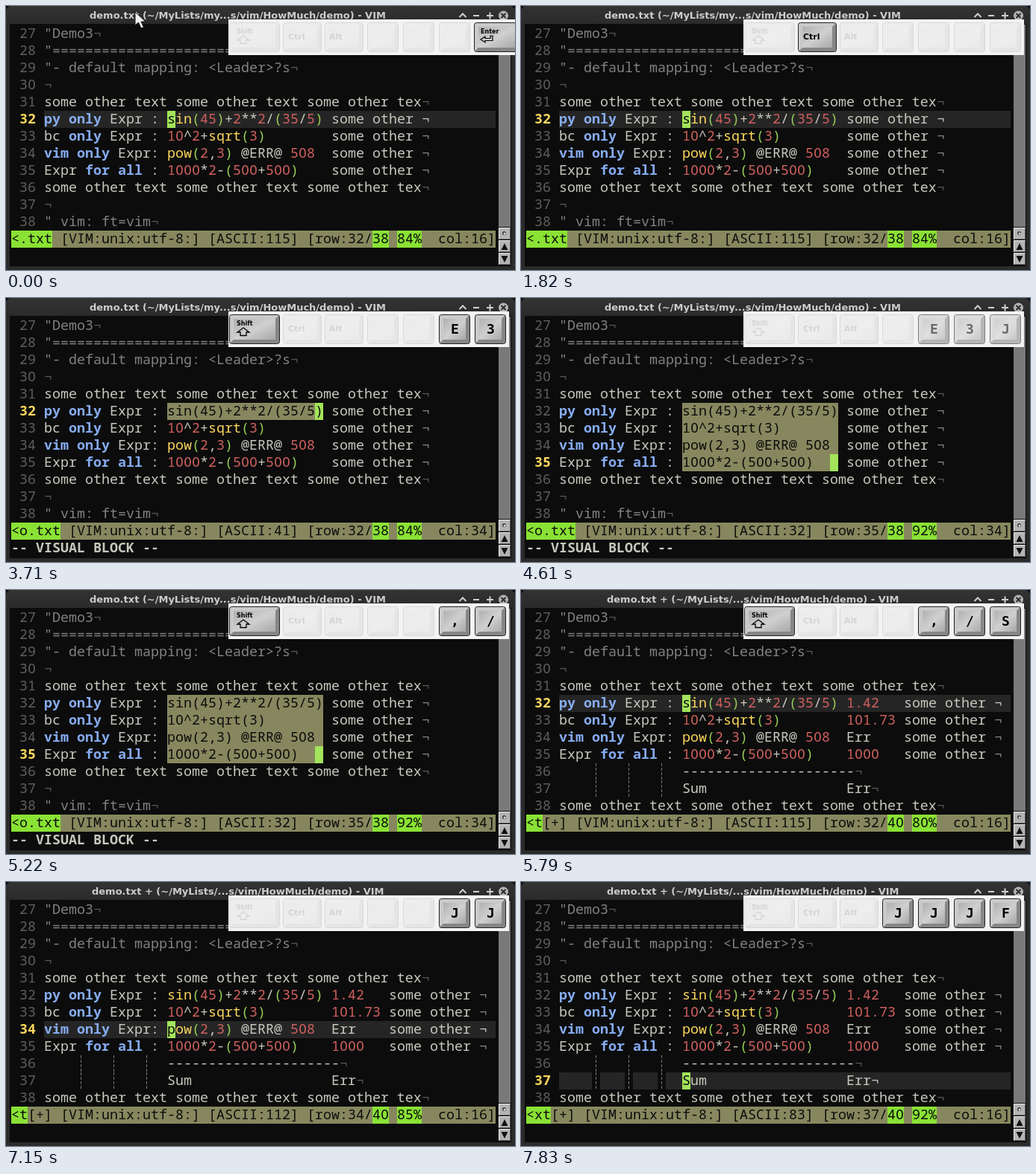
Write an HTML page that moves like this. It is 682 by 355 pixels and loops after 8 s.

```html
<!DOCTYPE html>
<html lang="en">
<head>
<meta charset="utf-8">
<title>Vim column sums</title>
<style>
  html, body { margin: 0; width: 100%; height: 100%; overflow: hidden; background: #2b2b2b; }
  svg { display: block; width: 682px; height: 355px; }
  text { white-space: pre; }
  .term text { font: 18.333px "Noto Sans Mono", "DejaVu Sans Mono", monospace; fill: #c8c8be; }
  .term .zero { font-family: "DejaVu Sans", sans-serif; font-size: 17.290px; }
  .term .key { fill: #86acf0; font-weight: 700; }
  .term .fn { fill: #fcd75e; }
  .term .num { fill: #d0605e; }
  .term .par { fill: #98cf58; }
  .term .note { fill: #828282; }
  .term .eol { fill: #585858; }
  .term .eol2 { fill: #868686; }
  .term .eol3 { fill: #c8c8c8; }
  .term .nr { fill: #5e5e5e; }
  .term .cur { fill: #fcd75e; font-weight: 700; }
  .term .ink { fill: #0c0c0c; }
  .term .msg { font-weight: 700; }
  .title { font: 700 13px "DejaVu Sans", sans-serif; fill: #cccccc; }
  .cap { font: 700 18px "DejaVu Sans Mono", monospace; text-anchor: middle; }
  .mod { font: 700 11px "DejaVu Sans", sans-serif; }
  .tiny { font: 700 8px "DejaVu Sans", sans-serif; }
</style>
</head>
<body>
<svg viewBox="0 0 682 355">
  <defs>
    <linearGradient id="bar" x1="0" y1="0" x2="0" y2="1">
      <stop offset="0" stop-color="#333"/><stop offset="1" stop-color="#2b2b2b"/>
    </linearGradient>
    <linearGradient id="face" x1="0" y1="0" x2="1" y2="1">
      <stop offset="0" stop-color="#b0b0b0"/><stop offset=".5" stop-color="#d0d0d0"/><stop offset="1" stop-color="#a8a8a8"/>
    </linearGradient>
  </defs>

  <rect width="682" height="355" fill="#2b2b2b"/>
  <rect width="682" height="22" fill="url(#bar)"/>
  <path d="M0 0h6q-5 1-6 6zM682 0h-6q5 1 6 6z" fill="#0a0a0a"/>
  <rect x="5" y="24" width="672" height="326" fill="#0c0c0c"/>
  <text id="title" class="title" y="17"></text>
  <g fill="none" stroke="#cfcfcf" stroke-width="2">
    <path d="M607.500 15l4.500-4.500 4.500 4.500M626 13h8M644 13h9M648.500 8.500v9"/>
    <circle cx="666.500" cy="13" r="6.500" fill="#b4b4b4" stroke="none"/>
    <path d="M663.500 10l6 6M669.500 10l-6 6" stroke="#2b2b2b"/>
  </g>

  <rect x="659" y="24" width="18" height="326" fill="#0c0c0c"/>
  <rect x="660" y="25" width="16" height="272" fill="#7a7a7a"/>
  <g id="buttons"></g>

  <g id="term" class="term"></g>
  <g id="keys"></g>
  <path id="mouse" d="M0 0v18l4.500-4 3.500 8 3.500-1.500-3.500-7.500h6z" fill="#f2f2f2" stroke="#111"/>
</svg>

<script>
const $ = id => document.getElementById(id);
const LOOP = 8000, CW = 11, LH = 23, LEFT = 7, TOP = 26, FIRST = 27, GUTTER = 4, COLS = 59;
const OLIVE = '#87875f', GREEN = '#8ae234', CURSOR = '#a3e45a';

// Each step overrides part of the state from its time on.
const steps = [
  [0, { row: 32, col: 15, keys: '', mods: '', msg: '', fade: 0, block: false, done: false, enter: true, mouse: [173, 8] }],
  [60, { mouse: [150, 14] }],
  [120, { mouse: [105, 27] }],
  [170, { mouse: [50, 42] }],
  [230, { mouse: [5, 50] }],
  [290, { mouse: null, enter: false }],
  [1820, { mods: 'C' }],
  [2630, { keys: 'V' }],
  [2670, { block: true, msg: '-- VISUAL BLOCK --' }],
  [3050, { mods: 'CS' }],
  [3280, { mods: 'S', keys: 'E' }],
  [3320, { col: 33 }],
  [3710, { keys: 'E3' }],
  [4000, { keys: 'E3J' }],
  [4040, { row: 35 }],
  [4610, { mods: '', fade: .5 }],
  [4770, { keys: '', fade: 0 }],
  [4860, { keys: ',' }],
  [5070, { mods: 'S' }],
  [5220, { keys: ',/' }],
  [5610, { keys: ',/S' }],
  [5650, { row: 32, col: 15, block: false, msg: 'block of 4 lines yanked' }],
  [5790, { done: true, msg: '' }],
  [6170, { fade: .35 }],
  [6300, { fade: .7 }],
  [6420, { keys: '', mods: '', fade: 0 }],
  [6890, { keys: 'J' }],
  [6930, { row: 33 }],
  [7110, { keys: 'JJ' }],
  [7150, { row: 34 }],
  [7230, { keys: 'JJJ' }],
  [7270, { row: 35 }],
  [7400, { keys: 'JJJJ' }],
  [7440, { row: 36 }],
  [7600, { row: 37 }],
  [7830, { keys: 'JJJF' }]
];

const filler = 'some other text some other text some other tex';
const head = ['"Demo3', '"' + '='.repeat(40), '"- default mapping: <Leader>?s', '', filler];
const exprs = ['py only Expr : sin(45)+2**2/(35/5)', 'bc only Expr : 10^2+sqrt(3)',
  'vim only Expr: pow(2,3) @ERR@ 508', 'Expr for all : 1000*2-(500+500)'];
const results = ['1.42', '101.73', 'Err', '1000'];
const pad = ' '.repeat(15);

function buffer(done) {
  const body = exprs.map((e, i) => e.padEnd(35) + (done ? results[i].padEnd(7) : '') + 'some other ');
  const tail = done
    ? [pad + '-'.repeat(21), (pad + 'Sum').padEnd(35) + 'Err', filler]
    : [filler, '', '" vim: ft=vim'];
  return [...head, ...body, ...tail];
}
const before = buffer(false), after = buffer(true);

const esc = s => s.replace(/&/g, '&amp;').replace(/</g, '&lt;');
const colX = c => LEFT + c * CW;
const rowY = r => TOP + r * LH;
const rect = (x, y, w, h, fill, more = '') =>
  `<rect x="${x}" y="${y}" width="${w}" height="${h}" fill="${fill}" ${more}/>`;
const label = (x, y, s, cls) => `<text x="${x}" y="${y}" class="${cls}">${s}</text>`;
// The terminal face has an open zero, one cell wide.
const openZero = s => s.replace(/0/g, '<tspan class="zero">0</tspan>');
const write = (c, r, s, cls = '') => s.trim() ? label(colX(c), rowY(r) + 17, openZero(esc(s)), cls) : '';
const fillCells = (c, r, n, color) => rect(colX(c), rowY(r), n * CW, LH, color);

const TOKEN = /\b(?:py|only|vim|for|all)\b|\b(?:sin|sqrt|pow)\b|\d+(?:\.\d+)?|[()]|[^\s()\d]+?(?=[\s()\d]|\b|$)|\s+/g;
function tokenClass(s) {
  if (/^(py|only|vim|for|all)$/.test(s)) return 'key';
  if (/^(sin|sqrt|pow)$/.test(s)) return 'fn';
  if (/^\d/.test(s)) return 'num';
  return /^[()]$/.test(s) ? 'par' : '';
}

function drawLine(s, r, st) {
  const nr = FIRST + r, here = nr === st.row, lit = here && !st.block;
  const isExpr = nr >= 32 && nr <= 35;
  let out = lit ? fillCells(GUTTER, r, COLS - GUTTER, '#252525') : '';
  out += write(1, r, String(nr), here ? 'cur' : 'nr');
  if (s[0] === '"') out += write(GUTTER, r, s, 'note');
  else if (!isExpr) {
    const indent = s.length - s.trimStart().length;
    out += write(GUTTER + indent, r, s.trimStart());
    if (indent) for (const c of [4, 8, 12]) {
      const x = colX(GUTTER + c);
      if (lit) out += fillCells(GUTTER + c, r, 1, '#0c0c0c');
      out += `<path d="M${x + 5.5} ${rowY(r)}v${LH}" stroke="#777" stroke-dasharray="4 2"/>`;
    }
  } else for (const m of s.matchAll(TOKEN)) {
    out += write(GUTTER + m.index, r, m[0], tokenClass(m[0]));
  }
  return out + write(GUTTER + s.length, r, '¬', lit ? 'eol3' : isExpr ? 'eol2' : 'eol');
}

// Repaint cells from column a up to b in dark ink on a colour.
function invert(s, r, a, b, color) {
  return fillCells(GUTTER + a, r, b - a, color) + write(GUTTER + a, r, s.slice(a, b), 'ink');
}

function drawStatus(st, lines) {
  const r = lines.length, total = st.done ? 40 : 38;
  const code = String(lines[st.row - FIRST].charCodeAt(st.col));
  const flag = st.done ? '[+]' : '';
  const name = '<' + 'demo.txt'.slice(code.length + flag.length - 7);
  const parts = [
    [name, GREEN],
    [`${flag} [VIM:unix:utf-8:] [ASCII:${code}] [row:${st.row}/`, OLIVE],
    [String(total), GREEN], [' ', OLIVE],
    [Math.floor(st.row / total * 100) + '%', GREEN],
    [`  col:${st.col + 1}]`, OLIVE]
  ];
  let c = 0, out = '';
  for (const [s, color] of parts) {
    out += fillCells(c, r, s.length, color) + write(c, r, s, 'ink');
    c += s.length;
  }
  return out;
}

function drawTerm(st) {
  const lines = st.done ? after : before, cur = st.row - FIRST;
  let out = lines.map((s, r) => drawLine(s, r, st)).join('');
  if (st.block) for (let r = 5; r <= cur; r++) out += invert(lines[r], r, 15, st.col + 1, OLIVE);
  out += invert(lines[cur], cur, st.col, st.col + 1, CURSOR);
  return out + drawStatus(st, lines) + write(0, lines.length + 1, st.msg, st.block ? 'msg' : '');
}

function keyCap(x, w, art, alpha) {
  const r = x + w, m = 6;
  return `<g opacity="${alpha}">
    ${rect(x + .5, 22.5, w - 1, 39, '#a0a0a0', 'rx="3"')}
    <path d="M${x + 1} 61V23H${r - 1}l-${m} ${m}H${x + m}V${62 - m}z" fill="#cacaca"/>
    <path d="M${r - 1} 23V61H${x + 1}l${m}-${m}H${r - m}V28z" fill="#868686"/>
    ${rect(x + m, 28, w - 2 * m, 28, 'url(#face)')}
    ${rect(x + .5, 22.5, w - 1, 39, 'none', 'rx="3" stroke="#222"')}
    ${art}</g>`;
}

function drawKeys(st) {
  const GHOST = .12, on = 1 - st.fade * (1 - GHOST);
  const alpha = down => down ? on : GHOST;
  const shift = label(309, 37, 'Shift', 'tiny') +
    '<path d="M318 40l8 6h-4v4.500h-8v-4.500h-4z" fill="none" stroke="#000" stroke-width="1.300"/>';
  let out = rect(298, 18, st.enter ? 390 : 376, 48, '#f3f3f3');
  out += keyCap(299, 68, shift, alpha(st.mods.includes('S')));
  out += keyCap(371, 52, label(378, 45, 'Ctrl', 'mod'), alpha(st.mods.includes('C')));
  out += keyCap(427, 52, label(433, 45, 'Alt', 'mod'), GHOST);
  const slots = st.keys.padStart(4);
  for (let i = 0; i < 4; i++) {
    const x = 484 + i * 48, ch = slots[i].trim();
    if (st.enter && i === 3) {
      const art = label(636, 37, 'Enter', 'tiny') +
        '<path d="M649 40h3v6.500h-10v2.500l-6-4 6-4v2.500h7z" fill="none" stroke="#000" stroke-width="1.200"/>';
      out += keyCap(627, 62, art, 1);
    } else {
      out += keyCap(x, 42, ch && label(x + 21.5, 48, ch, 'cap'), alpha(ch));
    }
  }
  return out;
}

function drawButtons() {
  const marks = ['<circle cx="667.500" cy="305.500" r="2.500" fill="#333"/><circle cx="668" cy="306" r="1.500" fill="#eee"/>',
    '<path d="M663.500 328l4.500-9 4.500 9z" fill="#111"/>', '<path d="M663.500 336l4.500 9 4.500-9z" fill="#111"/>'];
  return marks.map((m, i) => {
    const y = 298 + i * 17;
    return rect(660, y, 16, 16, '#b4b4b4') +
      `<path d="M660.500 ${y + 15}V${y + .5}H675" fill="none" stroke="#f0f0f0"/>
       <path d="M675.500 ${y + 1}V${y + 15.5}H661" fill="none" stroke="#5c5c5c"/>` + m;
  }).join('');
}

function show(st) {
  $('title').setAttribute('x', st.done ? 115 : 112);
  $('title').textContent = st.done
    ? 'demo.txt + (~/MyLists/...s/vim/HowMuch/demo) - VIM'
    : 'demo.txt (~/MyLists/my...s/vim/HowMuch/demo) - VIM';
  $('term').innerHTML = drawTerm(st);
  $('keys').innerHTML = drawKeys(st);
  $('mouse').setAttribute('visibility', st.mouse ? 'visible' : 'hidden');
  if (st.mouse) $('mouse').setAttribute('transform', `translate(${st.mouse})`);
}

let shown = -1;
function tick() {
  const t = performance.now() % LOOP;
  const n = steps.filter(s => s[0] <= t).length;
  if (n !== shown) {
    shown = n;
    show(Object.assign({}, ...steps.slice(0, n).map(s => s[1])));
  }
  requestAnimationFrame(tick);
}

$('buttons').innerHTML = drawButtons();
tick();
</script>
</body>
</html>
```
